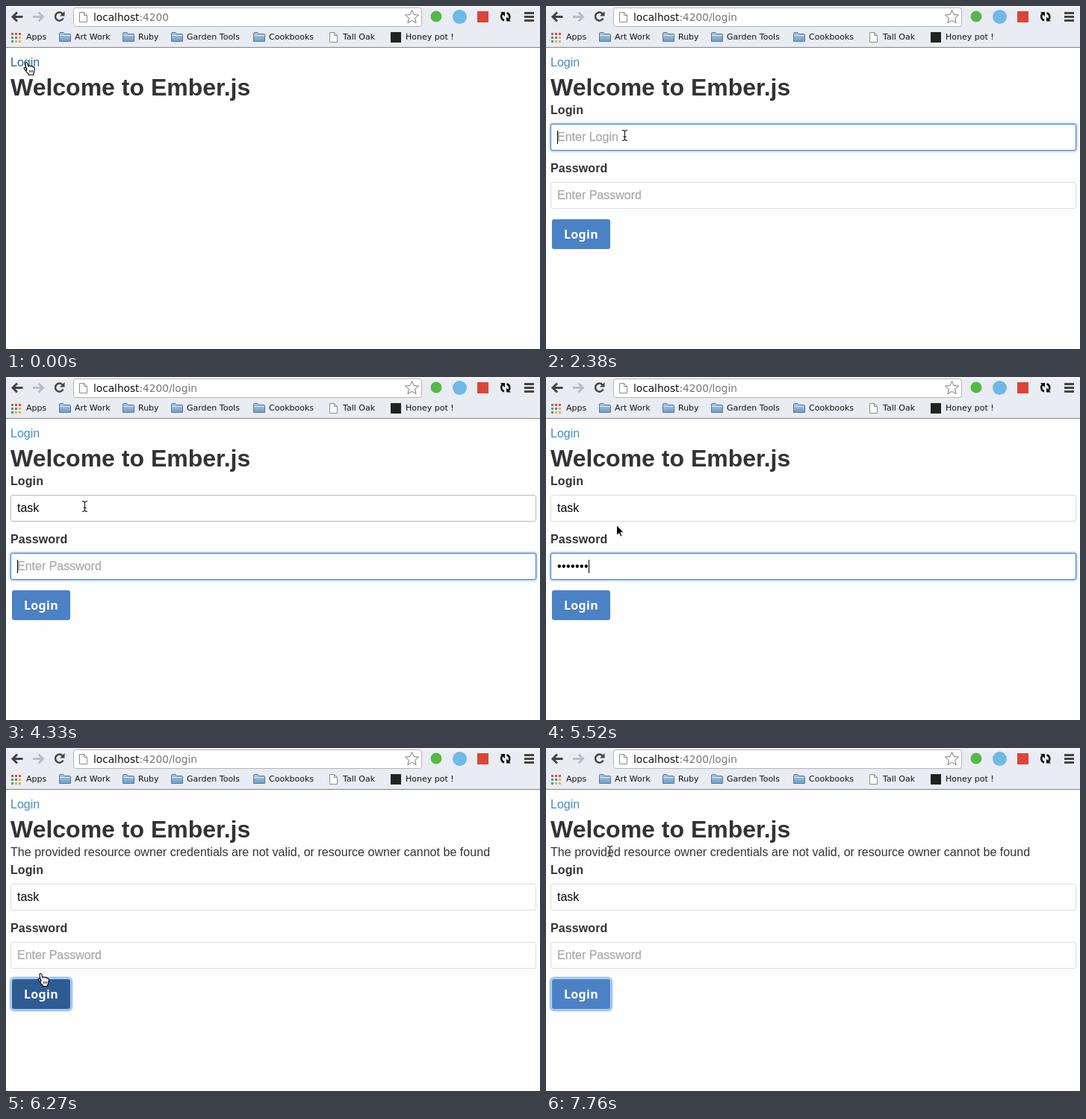
These frames come from a looping animation (715x460 px, 8 s). An HTML page:

```html
<!DOCTYPE html>
<html lang="en">
<head>
<meta charset="utf-8">
<title>Login form</title>
<style>
html, body { margin: 0; width: 100%; height: 100%; overflow: hidden; background: #fefefe; }
body { position: relative; font: 16px/24px "Liberation Sans", Arial, sans-serif; color: #333; }
body *, .abs { position: absolute; box-sizing: border-box; white-space: pre; }
svg * , .flow, .flow * { position: static; }

/* every animated part shares one 8 s clock with hard steps */
.t { animation: 8s step-end infinite; }

/* browser bar */
#bar { left: 0; top: 0; width: 715px; height: 56px; border-bottom: 1px solid #858585;
  background: linear-gradient(#f4f5f6, #e9ecf2 5px, #e9ecf2); }
#bar svg { left: 0; top: 0; }
#url { left: 117px; top: 3px; font: 13.7px/24px "DejaVu Sans", sans-serif; color: #111; }
#url i { font-style: normal; color: #777; }
.mark { top: 34px; font: 11px/16px "DejaVu Sans", sans-serif; color: #111; }

/* page */
#link { left: 6px; top: 64px; color: #428bca; animation-name: link; }
h1 { left: 6px; top: 92px; margin: 0; font-size: 32px; line-height: 35px; }
#error { left: 6px; top: 128px; letter-spacing: .04px; opacity: 0; animation-name: error; }
#form { left: 0; top: 128px; width: 715px; height: 220px; animation-name: form; }
label { left: 6px; font-weight: bold; letter-spacing: .1px; }
.field { left: 6px; width: 704px; height: 36px; border: 1px solid #ddd; border-radius: 3px;
  background: #fff; line-height: 34px; color: #000; }
.field > span { left: 8px; top: 0; }
.hint { color: #a9a9a9; -webkit-text-stroke: .25px #a9a9a9; }
.caret { left: 8px; top: 8px; width: 1px; height: 18px; background: #000; opacity: 0; }
.dots { letter-spacing: .4px; }
#button { left: 8px; top: 158px; width: 78px; height: 40px; border-radius: 3px; background: #4b81c5;
  color: #fff; font: bold 16px/40px "Noto Sans", sans-serif; letter-spacing: .3px;
  text-indent: 16px; animation-name: button; }

#user { top: 30px; animation-name: user; }
#pass { top: 108px; animation-name: pass; }
#userHint { animation-name: userHint; }
#passHint { animation-name: passHint; }
#u1, #u2, #p1, #p2, #p3 { opacity: 0; }
#u1 { animation-name: u1; } #u2 { animation-name: u2; }
#p1 { animation-name: p1; } #p2 { animation-name: p2; } #p3 { animation-name: p3; }
#userCaret { animation-name: userCaret; }
#passCaret { animation-name: passCaret; }

/* pointer */
#pointer { left: 0; top: 0; width: 0; height: 0; animation-name: move; }
#pointer svg { left: -12px; top: -12px; opacity: 0; }
#hand { animation-name: hand; } #beam { animation-name: beam; } #arrow { animation-name: arrow; }

@keyframes path { 0% { opacity: 0 } 15% { opacity: 1 } }
@keyframes link { 0% { color: #2a6496 } 24.25% { color: #428bca } }
@keyframes error { 0% { opacity: 0 } 78.375% { opacity: 1 } }
@keyframes form {
  0% { opacity: 0; transform: none }
  15% { opacity: 1; transform: none }
  78.375% { opacity: 1; transform: translateY(24px) }
}
@keyframes user {
  0% { border-color: #ddd; box-shadow: none }
  28% { border-color: #b9b9b9; box-shadow: none }
  29.75% { border-color: #4680c8; box-shadow: 0 0 3px 1px #8fb6e8 }
  54.125% { border-color: #b9b9b9; box-shadow: none }
  69% { border-color: #ddd; box-shadow: none }
  91.375% { border-color: #b9b9b9; box-shadow: none }
  93.25% { border-color: #ddd; box-shadow: none }
}
@keyframes pass {
  0% { border-color: #ddd; box-shadow: none }
  54.125% { border-color: #4680c8; box-shadow: 0 0 3px 1px #8fb6e8 }
  76.5% { border-color: #ddd; box-shadow: none }
  87.625% { border-color: #b9b9b9; box-shadow: none }
  89.5% { border-color: #ddd; box-shadow: none }
}
@keyframes userHint { 0% { opacity: 1 } 46.625% { opacity: 0 } }
@keyframes passHint { 0% { opacity: 1 } 59.75% { opacity: 0 } 78.375% { opacity: 1 } }
@keyframes u1 { 0% { opacity: 0 } 46.625% { opacity: 1 } }
@keyframes u2 { 0% { opacity: 0 } 50.375% { opacity: 1 } }
@keyframes p1 { 0% { opacity: 0 } 59.75% { opacity: 1 } 78.375% { opacity: 0 } }
@keyframes p2 { 0% { opacity: 0 } 61.625% { opacity: 1 } 78.375% { opacity: 0 } }
@keyframes p3 { 0% { opacity: 0 } 63.5% { opacity: 1 } 78.375% { opacity: 0 } }
@keyframes userCaret {
  0% { opacity: 0; left: 8px }
  29.75% { opacity: 1; left: 8px }
  37.25% { opacity: 0; left: 8px }
  42.875% { opacity: 1; left: 8px }
  46.625% { opacity: 1; left: 22px }
  50.375% { opacity: 1; left: 39px }
  54.125% { opacity: 0; left: 39px }
}
@keyframes passCaret {
  0% { opacity: 0; left: 8px }
  54.125% { opacity: 1; left: 8px }
  59.75% { opacity: 1; left: 26px }
  61.625% { opacity: 1; left: 38px }
  63.5% { opacity: 1; left: 50px }
  76.5% { opacity: 0; left: 50px }
}
@keyframes button {
  0% { background: #4b81c5; box-shadow: none }
  72.75% { background: #2f5b95; box-shadow: none }
  76.5% { background: #2f5b95; box-shadow: 0 0 0 1px #c3daf3, 0 0 2px 3px #8db8e8 }
  85.75% { background: #4b81c5; box-shadow: 0 0 0 1px #c3daf3, 0 0 2px 3px #8db8e8 }
}
@keyframes move {
  0% { transform: translate(31px, 84px) }
  24.25% { transform: translate(40px, 102px) }
  26.125% { transform: translate(78px, 140px) }
  28% { transform: translate(102px, 169px) }
  29.75% { transform: translate(105px, 173px) }
  69% { transform: translate(98px, 206px) }
  70.875% { transform: translate(84px, 252px) }
  72.75% { transform: translate(61px, 299px) }
  74.625% { transform: translate(50px, 311px) }
  85.75% { transform: translate(50px, 304px) }
  87.625% { transform: translate(52px, 280px) }
  89.5% { transform: translate(61px, 249px) }
  91.375% { transform: translate(68px, 211px) }
  93.25% { transform: translate(77px, 178px) }
  95.125% { transform: translate(83px, 146px) }
  97% { transform: translate(85px, 138px) }
}
@keyframes hand { 0% { opacity: 1 } 24.25% { opacity: 0 } 72.75% { opacity: 1 } 85.75% { opacity: 0 } }
@keyframes beam {
  0% { opacity: 0 } 24.25% { opacity: 1 } 26.125% { opacity: 0 } 28% { opacity: 1 }
  69% { opacity: 0 } 70.875% { opacity: 1 } 72.75% { opacity: 0 }
  87.625% { opacity: 1 } 89.5% { opacity: 0 } 91.375% { opacity: 1 } 93.25% { opacity: 0 }
  95.125% { opacity: 1 }
}
@keyframes arrow {
  0% { opacity: 0 } 26.125% { opacity: 1 } 28% { opacity: 0 } 69% { opacity: 1 } 70.875% { opacity: 0 }
  85.75% { opacity: 1 } 87.625% { opacity: 0 } 89.5% { opacity: 1 } 91.375% { opacity: 0 }
  93.25% { opacity: 1 } 95.125% { opacity: 0 }
}
</style>
</head>
<body>
<div id="bar">
  <svg width="715" height="55" fill="none">
    <defs>
      <linearGradient id="blue" x2="0" y2="1"><stop stop-color="#a9c9e2"/><stop offset="1" stop-color="#6f9fc6"/></linearGradient>
      <g id="folder">
        <path d="M.5 12.5V2q0-1.500 1.500-1.500h4l1.500 2h6.500q1.500 0 1.500 1.500v8.500z" fill="url(#blue)" stroke="#56799a"/>
        <path d="M1 4.500h14" stroke="#d2e4f1"/>
      </g>
      <path id="sheet" d="M.5.5h6l4 4v9h-10zM6.500.5v4h4" fill="#fff" stroke="#8c8c8c"/>
    </defs>
    <rect x="90.500" y="2.500" width="466" height="25" rx="3" fill="#fff" stroke="#b3b5b9"/>
    <path id="back" d="M22.500 14.500H10M15 8.500l-6 6 6 6" stroke="#444" stroke-width="3"/>
    <path d="M36 14.500h12.500M43.500 8.500l6 6-6 6" stroke="#bbbdc0" stroke-width="3"/>
    <path d="M75.500 10.300A5.500 5.500 0 1 0 76.500 16.500" stroke="#444" stroke-width="2.500"/>
    <path d="M78.500 7v6.500H72z" fill="#444"/>
    <use href="#sheet" x="98" y="8"/>
    <path d="M543.500 5.500l2.600 6 6.400.6-4.900 4.200 1.500 6.400-5.600-3.400-5.600 3.400 1.500-6.400-4.900-4.200 6.400-.6z" fill="#fff" stroke="#777"/>
    <circle cx="576" cy="14" r="7.500" fill="#56b847"/>
    <circle cx="607.500" cy="14.500" r="9.500" fill="#6fb9e6"/>
    <rect x="631" y="7" width="15" height="15" fill="#dc4437"/>
    <path d="M665 10a5.500 5.500 0 0 0 2 9.300M672.500 18.500a5.500 5.500 0 0 0-2-9.300" stroke="#111" stroke-width="2.500"/>
    <path d="M662 8h6v6zM676 20.500h-6v-6z" fill="#111"/>
    <path d="M694 9.500h13M694 14.500h13M694 19.500h13" stroke="#444" stroke-width="3"/>
    <g stroke-width="3" stroke-dasharray="3 2">
      <path d="M7 37.500h13" stroke="#d9503f"/>
      <path d="M7 42.500h3" stroke="#4da35a"/><path d="M12 42.500h3" stroke="#4b82d0"/><path d="M17 42.500h3" stroke="#e4b13c"/>
      <path d="M7 47.500h3" stroke="#4da35a"/><path d="M12 47.500h8" stroke="#e4b13c"/>
    </g>
    <use href="#folder" x="71" y="35"/><use href="#folder" x="156" y="35"/>
    <use href="#folder" x="221" y="35"/><use href="#folder" x="331" y="35"/>
    <use href="#sheet" x="433" y="35"/>
    <rect x="515" y="35" width="14" height="14" fill="#222"/>
  </svg>
  <div id="url"><span class="flow">localhost<i>:4200</i><i class="t" style="animation-name:path">/login</i></span></div>
  <span class="mark" style="left:27px">Apps</span>
  <span class="mark" style="left:92px">Art Work</span>
  <span class="mark" style="left:177px">Ruby</span>
  <span class="mark" style="left:242px">Garden Tools</span>
  <span class="mark" style="left:352px">Cookbooks</span>
  <span class="mark" style="left:451px">Tall Oak</span>
  <span class="mark" style="left:535px">Honey pot !</span>
</div>

<span id="link" class="t">Login</span>
<h1>Welcome to Ember.js</h1>
<div id="error" class="t">The provided resource owner credentials are not valid, or resource owner cannot be found</div>

<div id="form" class="t">
  <label style="top:0">Login</label>
  <div id="user" class="field t">
    <span id="userHint" class="hint t">Enter Login</span>
    <span><b id="u1" class="flow t" style="font-weight:400">ta</b><b id="u2" class="flow t" style="font-weight:400">sk</b></span>
    <i id="userCaret" class="caret t"></i>
  </div>
  <label style="top:78px">Password</label>
  <div id="pass" class="field t">
    <span id="passHint" class="hint t">Enter Password</span>
    <span class="dots"><b id="p1" class="flow t" style="font-weight:400">•••</b><b id="p2" class="flow t" style="font-weight:400">••</b><b id="p3" class="flow t" style="font-weight:400">••</b></span>
    <i id="passCaret" class="caret t"></i>
  </div>
  <div id="button" class="t">Login</div>
</div>

<div id="pointer" class="t">
  <svg id="hand" class="t" width="24" height="24">
    <path d="M8.500 14.500 7 5.500Q6.700 3.700 8 3.500t1.900 1.600l1.100 4.200q.4-1.500 1.700-1.300t1.500 1.300q.6-1 1.700-.7t1.200 1.500q.9-.6 1.600 0t.5 2.400l-.6 4.500-1 2v1.500h-6.500v-1.500q-2.500-2-4-4.500l-1.800-2.600q-.6-1.300.5-1.700t3.200 2z" fill="#fff" stroke="#000" stroke-width="1.100" stroke-linejoin="round"/>
    <path d="M12.500 14v3M14.500 14v3M16.500 14v3" stroke="#000" stroke-width=".8"/>
  </svg>
  <svg id="beam" class="t" width="24" height="24" fill="none">
    <path id="bar1" d="M9 5.500q3.500 0 3.500 2.500v9q0 2.500-3.500 2.500M16 5.500q-3.500 0-3.500 2.500M16 19.500q-3.500 0-3.500-2.500M10.500 14.500h4" stroke="#fff" stroke-width="2.400" opacity=".7"/>
    <path d="M9 5.500q3.500 0 3.500 2.500v9q0 2.500-3.500 2.500M16 5.500q-3.500 0-3.500 2.500M16 19.500q-3.500 0-3.500-2.500M10.500 14.500h4" stroke="#111" stroke-width="1.100"/>
  </svg>
  <svg id="arrow" class="t" width="24" height="24">
    <path d="M8.500 4.500v14l3.300-3 2 4.700 2.200-.9-2-4.600h4.300z" fill="#000" stroke="#fff"/>
  </svg>
</div>
</body>
</html>
```
